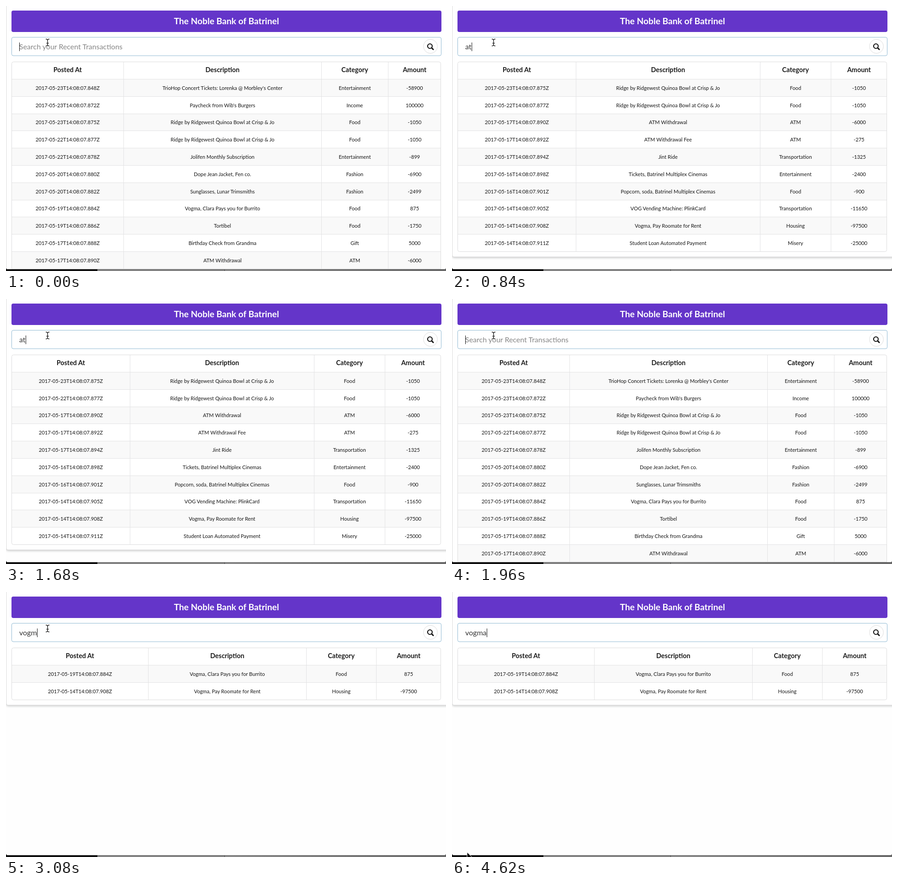
Animation of 963x581 px, one loop 4.73 s. Source, as an HTML page:

```html
<!DOCTYPE html>
<html lang="en">
<head>
<meta charset="utf-8">
<title>Transaction search</title>
<style>
  html, body { margin: 0; width: 100%; height: 100%; overflow: hidden; background: #fff; }
  svg { display: block; width: 963px; height: 581px; font-family: Lato, "Open Sans", sans-serif; }
  .title { font-size: 19.2px; font-weight: 700; fill: #fff; text-anchor: middle; }
  .head { font-size: 14.4px; font-weight: 700; fill: #1c1c1c; text-anchor: middle; }
  .cell { font-size: 11.2px; fill: #161616; text-anchor: middle; }
  .input { font-size: 16px; fill: #333; }
  .hint { fill: #868686; }
  .line { stroke: #e3e3e4; fill: none; }
  .frame { stroke: #dcdcdd; fill: none; }
  .panel { fill: #fff; stroke: #d9d9da; filter: drop-shadow(0 2px 2px rgba(34, 36, 38, .22)); }
</style>
</head>
<body>
<svg viewBox="0 0 963 581">
  <defs>
    <clipPath id="window"><path d="M0 0H963V573Q963 577 959 577H4Q0 577 0 573Z"/></clipPath>
    <linearGradient id="desk">
      <stop offset="0" stop-color="#8e8e8e"/>
      <stop offset="1" stop-color="#6c6c6c"/>
    </linearGradient>
  </defs>

  <rect y="570" width="200" height="11" fill="#121212"/>
  <rect x="200" y="570" width="278" height="11" fill="#868686"/>
  <rect x="478" y="570" width="485" height="11" fill="url(#desk)"/>
  <path d="M0 577.5H963" stroke="#000" stroke-opacity=".3"/>
  <path d="M478.5 577V581" stroke="#555"/>

  <g clip-path="url(#window)">
    <rect width="963" height="577" fill="#fefefe"/>
    <rect id="panel" class="panel" x=".5" y="-10" width="980" rx="4"/>
    <rect x="12" y="10" width="941" height="47" rx="4" fill="#6435c9"/>
    <text class="title" x="482.5" y="39.7">The Noble Bank of Batrinel</text>

    <rect x="12.5" y="68.5" width="940" height="40.5" rx="3.5" fill="#fff" stroke="#8fb9d3"/>
    <text id="query" class="input" x="29" y="95.3"></text>
    <path id="caret" d="M.5 80V99" stroke="#111"/>
    <circle cx="929" cy="88.5" r="15.3" fill="#fff" stroke="#dcdcdc"/>
    <g fill="none" stroke="#111">
      <circle cx="927.8" cy="88" r="5" stroke-width="2.2"/>
      <path d="M931.8 92L935 95.3" stroke-width="2.8" stroke-linecap="round"/>
    </g>
    <g id="table"></g>
  </g>

  <g id="beam" fill="none" stroke-linecap="round">
    <path id="beamShape" d="M87.5 72.5Q91 72.5 91 75.5Q91 72.5 94.5 72.5M91 75V85M87.5 87.5Q91 87.5 91 84.5Q91 87.5 94.5 87.5M89 81.5H93" stroke="#fff" stroke-width="3" stroke-opacity=".8"/>
    <use href="#beamShape"/>
    <path d="M87.5 72.5Q91 72.5 91 75.5Q91 72.5 94.5 72.5M91 75V85M87.5 87.5Q91 87.5 91 84.5Q91 87.5 94.5 87.5M89 81.5H93" stroke="#222" stroke-width="1.4"/>
  </g>
  <path id="arrow" d="M33 570.5V586L36.6 582.6L39 588L41.6 587L39.2 581.6H44Z" fill="#000" stroke="#fff"/>
</svg>

<script>
const LOOP = 4730, TOP = 160.5, PITCH = 37.8, LEFT = 12, RIGHT = 952;
const HEADS = ["Posted At", "Description", "Category", "Amount"];

// day, milliseconds, description, category, amount
const ROWS = [
  [23, 848, "TrioHop Concert Tickets: Lorenka @ Morbley's Center", "Entertainment", -58900],
  [23, 872, "Paycheck from Wib's Burgers", "Income", 100000],
  [23, 875, "Ridge by Ridgewest Quinoa Bowl at Crisp & Jo", "Food", -1050],
  [22, 877, "Ridge by Ridgewest Quinoa Bowl at Crisp & Jo", "Food", -1050],
  [22, 878, "Jolifen Monthly Subscription", "Entertainment", -899],
  [20, 880, "Dope Jean Jacket, Fen co.", "Fashion", -6900],
  [20, 882, "Sunglasses, Lunar Trimsmiths", "Fashion", -2499],
  [19, 884, "Vogma, Clara Pays you for Burrito", "Food", 875],
  [19, 886, "Tortibel", "Food", -1750],
  [17, 888, "Birthday Check from Grandma", "Gift", 5000],
  [17, 890, "ATM Withdrawal", "ATM", -6000],
  [17, 892, "ATM Withdrawal Fee", "ATM", -275],
  [17, 894, "Jint Ride", "Transportation", -1325],
  [16, 898, "Tickets, Batrinel Multiplex Cinemas", "Entertainment", -2400],
  [16, 901, "Popcorn, soda, Batrinel Multiplex Cinemas", "Food", -900],
  [14, 905, "VOG Vending Machine: PlinkCard", "Transportation", -11650],
  [14, 908, "Vogma, Pay Roomate for Rent", "Housing", -97500],
  [14, 911, "Student Loan Automated Payment", "Misery", -25000]
].map(([day, ms, ...rest]) => [`2017-05-${day}T14:08:07.${ms}Z`, ...rest]);

// inner column edges by number of matching rows
const WIDE = [257, 690, 836];
const EDGES = { 10: [271, 674, 829], 3: [300, 644, 816] };
const PAIR = { atm: [351, 617, 791], vogm: [311, 657, 810], vogma: [311, 657, 810] };

// time, search text, caret shown, arrow pointer
const STEPS = [
  [0, "", 1], [140, "", 0], [560, "a", 1], [840, "at", 1], [980, "atm", 1],
  [1400, "atm", 0], [1680, "at", 1], [1960, "", 1], [2520, "v", 1],
  [2660, "vo", 1], [2800, "vog", 1], [3080, "vogm", 1], [3360, "vogma", 1],
  [3780, "vogma", 0], [4200, "vogma", 1], [4620, "vogma", 1, 1]
];

const $ = id => document.getElementById(id);
const show = (id, on) => $(id).style.visibility = on ? "visible" : "hidden";

function add(tag, attrs, text = "") {
  const el = document.createElementNS("http://www.w3.org/2000/svg", tag);
  for (const key in attrs) el.setAttribute(key, attrs[key]);
  el.textContent = text;
  $("table").append(el);
}

function drawTable(text) {
  const rows = ROWS.filter(r => (r[2 - 1] + "|" + r[2]).toLowerCase().includes(text));
  const inner = PAIR[text] || EDGES[rows.length] || WIDE;
  const edges = [LEFT, ...inner, RIGHT];
  const rowY = i => Math.floor(TOP + i * PITCH) + .5;
  const bottom = rowY(rows.length);
  const write = (cells, cls, y) => cells.forEach((cell, i) =>
    add("text", { class: cls, x: (edges[i] + edges[i + 1]) / 2 + .3, y }, cell));

  $("table").replaceChildren();
  $("panel").setAttribute("height", bottom + 21.5);
  add("rect", { x: 12.5, y: 122, width: 939, height: bottom - 122, rx: 4, fill: "#fff" });
  rows.forEach((row, i) => {
    const y = rowY(i);
    if (i % 2 === 0) add("rect", { x: 13, y, width: 938, height: rowY(i + 1) - y, fill: "#f9f9f9" });
    add("path", { class: "line", d: `M13 ${y}H951` });
    write(row, "cell", 183.8 + i * PITCH);
  });
  inner.forEach(x => add("path", { class: "line", d: `M${x + .5} 122V${bottom}` }));
  add("rect", { class: "frame", x: 12.5, y: 122.5, width: 939, height: bottom - 122.5, rx: 4 });
  write(HEADS, "head", 145.2);
}

let current = -1, shown = null;

function render(time) {
  const index = STEPS.findLastIndex(step => step[0] <= time);
  if (index === current) return;
  current = index;
  const [, text, caret, arrow] = STEPS[index];
  if (text !== shown) {
    shown = text;
    const query = $("query");
    query.textContent = text || "Search your Recent Transactions";
    query.classList.toggle("hint", !text);
    const x = text ? 29 + Math.round(query.getComputedTextLength()) : 29;
    $("caret").setAttribute("transform", `translate(${x} 0)`);
    drawTable(text);
  }
  show("caret", caret);
  show("beam", !arrow);
  show("arrow", arrow);
}

const start = performance.now();
function tick(now) {
  render(Math.max(0, now - start) % LOOP);
  requestAnimationFrame(tick);
}
tick(start);
</script>
</body>
</html>
```
